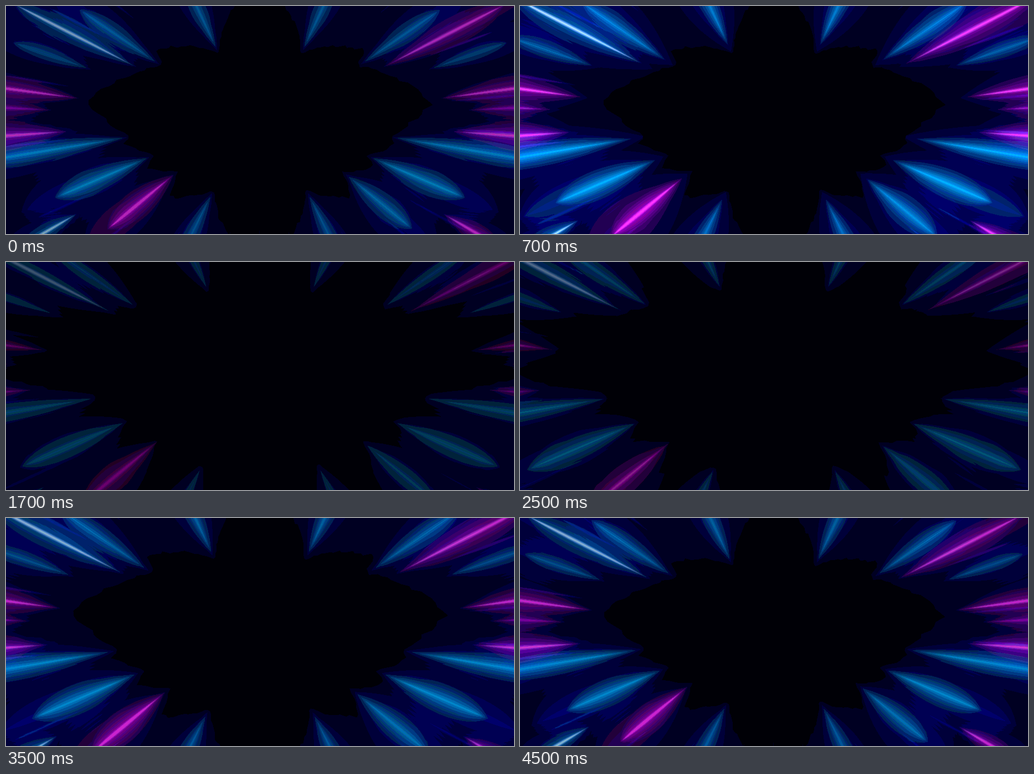
These frames come from a looping animation (917x412 px, 4.6 s). An HTML page with a canvas:

```html
<!DOCTYPE html>
<html lang="en">
<head>
<meta charset="utf-8">
<title>Light burst</title>
<style>
  html, body { margin: 0; width: 100%; height: 100%; overflow: hidden; background: #000006; }
  canvas { display: block; filter: url(#bands); }
  svg { position: absolute; }
</style>
</head>
<body>
<svg width="0" height="0">
  <filter id="bands" x="0" y="0" width="1" height="1" color-interpolation-filters="sRGB">
    <feComponentTransfer>
      <feFuncR type="discrete"/>
      <feFuncG type="discrete"/>
      <feFuncB type="discrete"/>
    </feComponentTransfer>
  </filter>
</svg>
<canvas id="stage" width="917" height="412"></canvas>
<script>
const ctx = document.getElementById('stage').getContext('2d');
const W = 917, H = 412, CX = 458.5, CY = 203;
const LOOP = 4600, STEP = 100, LAYERS = 10, BANDS = 11;
const RAD = Math.PI / 180;

// Even colour bands; the darkest blue band is not quite black.
for (const channel of 'RGB') {
  const floor = channel === 'B' ? .024 : 0;
  const levels = Array.from({ length: BANDS }, (_, i) => i ? (i + .4) / (BANDS - .6) : floor);
  document.querySelector('feFunc' + channel).setAttribute('tableValues', levels.join(' '));
}

const blue = { body: [0, 175, 165], halo: [0, 28, 85] };
const white = { ...blue, core: [180, 120, 130] };
const pink = { body: [210, 30, 185], halo: [62, 5, 80], core: [110, 35, 90] };

// The burst is mirrored: angle, inner and outer distance from the middle line,
// half width, strength, then the colours on the left and right.
const rays = [
  [-65, 77, 135, 17, .65, blue, blue],
  [-34.5, 182, 326, 20, .65, blue, blue],
  [-27.3, 222, 443, 24, .5, white, pink],
  [-19, 304, 446, 15, .45, blue, blue],
  [-7.7, 325, 540, 22, .5, pink, pink],
  [-2.9, 375, 540, 14, .25, pink, pink],
  [4.1, 345, 560, 26, .6, pink, pink],
  [9.4, 240, 530, 20, .85, blue, blue],
  [23.3, 200, 370, 23, .85, blue, blue],
  [30.3, 331, 432, 17, .6, white, pink],
  [39.5, 155, 275, 24, .72, pink, blue],
  [63.5, 86, 150, 18, .58, blue, blue]
];

// height of a ray at distance x; steep rays aim slightly past the centre
const rayY = (angle, x) => 2 - 45 * Math.sin(angle * RAD) + x * Math.tan(angle * RAD);

const petals = rays.flatMap(([angle, near, far, width, strength, left, right]) =>
  [[-1, left], [1, right]].map(([side, hue]) => ({
    ax: side * near, ay: rayY(angle, near), bx: side * far, by: rayY(angle, far),
    width, strength, hue
  })));

let seed = 7;
function random() {
  seed = seed * 16807 % 2147483647;
  return seed / 2147483647;
}

// Faint threads all around.
const threads = Array.from({ length: 22 }, (_, i) => {
  const a = (i + .2 + .6 * random()) / 22 * 2 * Math.PI;
  const x = Math.cos(a), y = Math.sin(a), r = 190 + 150 * x * x;
  return [r * x, r * y, 1.4 * r * x, 1.4 * r * y, 3];
});

// The dark centre reaches out to the ray tips and opens wider between them.
const tips = petals.map(({ ax, ay }) => ({ r: Math.hypot(ax, ay) * .94, a: Math.atan2(ay, ax) / RAD }));
const hole = Array.from({ length: 240 }, (_, i) => {
  const a = i * 1.5 - 180;
  const reach = tips.map(tip => {
    const turn = Math.abs(a - tip.a);
    return tip.r * (1 + .025 * Math.min(turn, 360 - turn));
  });
  const r = Math.min(...reach) * (1 + .04 * random());
  return [r * Math.cos(a * RAD), r * Math.sin(a * RAD)];
});

const tint = (color, k) => color.map(c => c * k);

// A glow built from nested petals, each adding an equal share of the colour.
function glow(ax, ay, bx, by, width, color, focus = 1) {
  const len = Math.hypot(bx - ax, by - ay);
  ctx.save();
  ctx.translate(ax, ay);
  ctx.rotate(Math.atan2(by - ay, bx - ax));
  ctx.fillStyle = `rgb(${color.map(c => Math.round(c / LAYERS))})`;
  for (let k = 1; k <= LAYERS; k++) {
    const f = k / LAYERS, w = 1.5 * width * f ** focus;
    const a = (1 - f) * .24 * len, b = len - (1 - f) * .1 * len;
    const p = a + (b - a) * .45, q = a + (b - a) * .84;
    ctx.beginPath();
    ctx.moveTo(a, 0);
    ctx.bezierCurveTo(p, w, q, w * .9, b, 0);
    ctx.bezierCurveTo(q, -w * .9, p, -w, a, 0);
    ctx.fill();
  }
  ctx.restore();
}

function drawPetal({ ax, ay, bx, by, width, strength, hue }) {
  const dx = bx - ax, dy = by - ay;
  glow(ax - dx * .08, ay - dy * .08, bx + dx * .4, by + dy * .4, width * 2.6, tint(hue.halo, .3 + .7 * strength));
  glow(ax, ay, bx, by, width, tint(hue.body, strength), 1.8);
  if (hue.core) glow(ax, ay, bx, by, 4, tint(hue.core, Math.min(1, 2 * strength)));
}

function drawBackdrop(scale) {
  ctx.fillStyle = 'rgb(0,0,42)';
  ctx.beginPath();
  ctx.rect(-W, -H, 2 * W, 2 * H);
  hole.forEach(([x, y], i) => ctx[i ? 'lineTo' : 'moveTo'](x * scale, y * scale));
  ctx.closePath();
  ctx.fill('evenodd');
}

function draw(time) {
  const t = Math.floor(time % LOOP / STEP) * STEP / 1000;
  const phase = Math.min(t, LOOP / 1000 - t);
  const zoom = 1 + .1 * phase;
  const light = .68 + .32 * Math.cos(2 * Math.PI * (phase - .6) / 2.4);

  ctx.globalCompositeOperation = 'source-over';
  ctx.setTransform(1, 0, 0, 1, 0, 0);
  ctx.fillStyle = '#000';
  ctx.fillRect(0, 0, W, H);

  ctx.setTransform(zoom, 0, 0, zoom, CX, CY);
  drawBackdrop(1 - .23 * (light - .7));
  ctx.globalCompositeOperation = 'lighter';
  petals.forEach(drawPetal);
  for (const thread of threads) glow(...thread, [20, 10, 60]);

  // dim the whole picture
  ctx.globalCompositeOperation = 'source-over';
  ctx.setTransform(1, 0, 0, 1, 0, 0);
  ctx.fillStyle = `rgba(0,0,0,${1 - light})`;
  ctx.fillRect(0, 0, W, H);
}

const start = performance.now();
function tick() {
  draw(performance.now() - start);
  requestAnimationFrame(tick);
}
tick();
</script>
</body>
</html>
```
